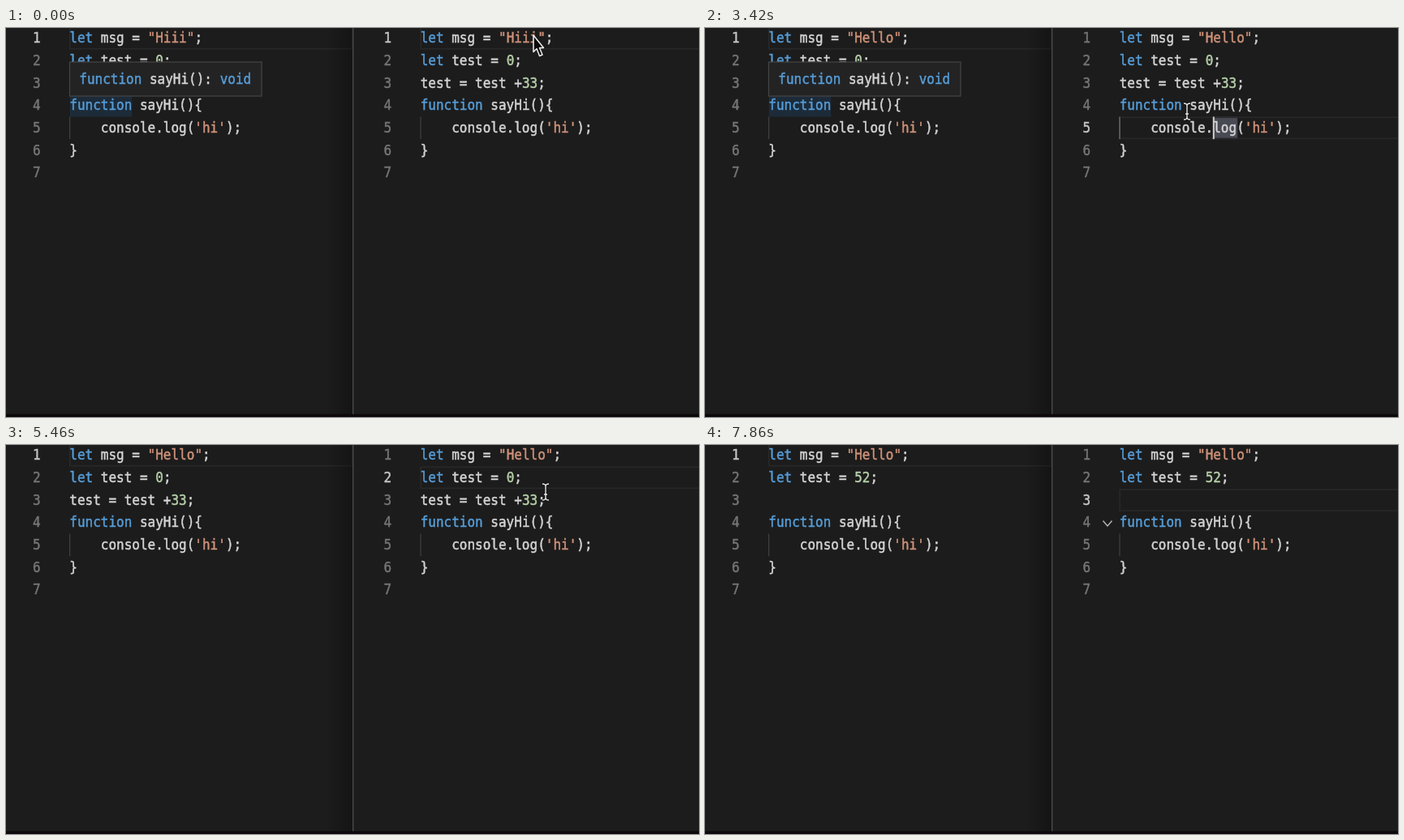
Write an HTML page that moves like this. It is 854 by 480 pixels and loops after 8000 ms.

```html
<!DOCTYPE html>
<html lang="en">
<head>
<meta charset="utf-8">
<title>Shared editor</title>
<style>
html, body { margin: 0; width: 100%; height: 100%; overflow: hidden; background: #1c1c1c; }
svg { display: block; width: 854px; height: 480px; }
text { font: 16px "DejaVu Sans Mono", monospace; white-space: pre; }
text, tspan { fill: currentColor; stroke: currentColor; stroke-width: .45px; }
</style>
</head>
<body>
<svg viewBox="0 0 854 480">
  <defs>
    <linearGradient id="shade">
      <stop offset="0" stop-color="#000" stop-opacity="0"/>
      <stop offset="1" stop-color="#000" stop-opacity=".28"/>
    </linearGradient>
    <path id="ibeam" d="M-4-10Q0-10 0-7Q0-10 4-10M0-7V7M-4 10Q0 10 0 7Q0 10 4 10M-2 3H2"/>
  </defs>
  <rect width="854" height="480" fill="#1c1c1c"/>
  <g id="scene"></g>
  <rect x="394" width="33" height="480" fill="url(#shade)"/>
  <rect x="427" width="1.4" height="480" fill="#4a4a4a"/>
  <rect y="476.5" width="854" height="3.5" fill="#0d080b"/>
  <g id="mouse">
    <path id="arrow" d="M0 0V20.5L4 16.5 7.5 25.5 11 24 7.5 15.5H12.5Z" fill="#0a0a0a" stroke="#eee" stroke-width="1.5" stroke-linejoin="round"/>
    <g id="beam" fill="none">
      <use href="#ibeam" stroke="#111" stroke-width="3"/>
      <use href="#ibeam" stroke="#e8e8e8" stroke-width="1.4"/>
    </g>
  </g>
</svg>
<script>
const LOOP = 8000, STEP = 60, BLINK = 480;
const CHAR = 9.633, ROW = 27.67, STRETCH = 1.15;
const LEFT = 78.3, RIGHT = 510.7;

// Key moments in ms
const FOCUS = 360, ERASE = 1680, TYPE = 2040, TYPED = 2520, CLICK_LOG = 3240,
  TIP_GONE = 3840, CLICK_NUMBER = 4980, EDIT = 5760, EDITED = 6000,
  DRAG = 6480, DROP = 6660, FOLD = 6840, DELETE = 7380;
// The caret stays lit during each span and blinks after it.
const BUSY = [[FOCUS, FOCUS], [ERASE, TYPED], [CLICK_LOG, CLICK_LOG],
  [CLICK_NUMBER, CLICK_NUMBER], [EDIT, EDITED], [DRAG, DROP], [DELETE, DELETE]];
// Pointer moves: start, end, x, y
const MOVES = [[60, 180, 655, 24], [540, 1260, 648, 33], [2820, 3180, 627, 123],
  [CLICK_LOG, 3420, 594, 103], [3420, 3600, 208, 108], [3600, 4080, 170, 116],
  [4200, CLICK_NUMBER, 627, 42], [5220, 5460, 665, 58], [6300, DRAG, 668, 67],
  [DRAG, 6840, 495, 66]];

const $ = id => document.getElementById(id);
const clamp = (v, lo, hi) => Math.min(hi, Math.max(lo, v));
const keys = (t, start, gap, max) => clamp(Math.floor((t - start) / gap) + 1, 0, max);

function mouseAt(t) {
  let x = 650, y = 9;
  for (const [start, end, nx, ny] of MOVES) {
    const u = clamp((t - start) / (end - start), 0, 1), e = u * u * (3 - 2 * u);
    x += (nx - x) * e;
    y += (ny - y) * e;
  }
  return [x, y];
}

function caretLit(t) {
  const span = BUSY.filter(s => s[0] <= t).pop();
  return span && Math.floor(Math.max(0, t - span[1]) / BLINK) % 2 === 0;
}

function activeRow(t) {
  if (t >= DRAG) return 2;
  if (t >= CLICK_NUMBER) return 1;
  return t >= CLICK_LOG ? 4 : 0;
}

const rect = (x, y, w, h, fill, more = '') =>
  `<rect x="${x}" y="${y}" width="${w}" height="${h}" fill="${fill}" ${more}/>`;
const rowTop = row => row * ROW - 1.2;
const bar = (x, row, w, fill) => rect(x, rowTop(row), w, ROW, fill);
const text = (x, y, s, color = '#d4d4d4') =>
  `<text transform="translate(${x} ${y}) scale(1 ${STRETCH})" color="${color}">${s}</text>`;

function paint(s) {
  return s.replace(/(let|function|void)|("[^"]*"|'[^']*')|\d+/g, (m, word, str) =>
    `<tspan color="${word ? '#569cd6' : str ? '#ce9178' : '#b5cea8'}">${m}</tspan>`);
}

function pane(x, edge, lines, active, boxed) {
  let out = '';
  if (boxed) out += rect(x + .5, rowTop(active) + .8, edge - x, ROW - 1.6, 'none',
    'stroke="#282828" stroke-width="1.6"');
  out += bar(x - .3, 4, 1.2, active === 4 ? '#777' : '#404040');
  lines.forEach((line, i) => {
    const y = 18.4 + i * ROW;
    out += text(x - 45.3, y, i + 1, i === active ? '#c6c6c6' : '#757575');
    out += text(x, y, paint(line));
  });
  return out;
}

const hover = () =>
  rect(78.5, 42, 236.5, 42, '#232324', 'stroke="#454545" stroke-width="1.2"') +
  text(90.3, 69, paint('function sayHi(): void'));

function draw(t) {
  const greeting = 'Hiii'.slice(0, 4 - keys(t, ERASE, 90, 3)) +
    'ello'.slice(0, keys(t, TYPE, 160, 4));
  const number = t < EDIT ? '0' : '52'.slice(0, keys(t, EDIT + 120, 120, 2));
  const cut = t > DELETE, selecting = t >= DRAG && !cut, tip = t < TIP_GONE;
  const lines = [`let msg = "${greeting}";`, `let test = ${number};`,
    cut ? '' : 'test = test +33;', 'function sayHi(){', "    console.log('hi');", '}', ''];

  const active = activeRow(t), [mx, my] = mouseAt(t);
  const full = 16 * CHAR, edge = clamp(mx - RIGHT, 0, full);
  const column = [11 + greeting.length, 11 + number.length, 0, 0, 12][active];
  const caret = RIGHT + (selecting ? edge : column * CHAR);

  let out = '';
  if (tip) out += bar(LEFT + .5, 3, 8 * CHAR - .5, '#1d2b39');
  if (active === 4) out += bar(RIGHT + 12 * CHAR + 1, 4, 3 * CHAR, '#474a53');
  if (selecting) out += bar(RIGHT + edge, 2, full - edge + 1, '#264f78');
  out += pane(LEFT, 426, lines, 0, true);
  out += pane(RIGHT, 858, lines, active, !selecting);
  if (tip) out += hover();
  if (caretLit(t)) out += bar(caret - .5, active, 2, '#d0d0d0');
  const fold = clamp((t - FOLD) / 180, 0, 1);
  out += `<path d="M490.5 93.5L496 100L501.5 93.5" fill="none" stroke="#b8b8b8" stroke-width="1.4" opacity="${fold}"/>`;
  $('scene').innerHTML = out;

  // Typing hides the pointer until it moves again.
  const hidden = (t >= ERASE && t < 2820) || (t >= EDIT && t < 6300) || cut;
  const arrow = t < 60 || mx < RIGHT;
  $('mouse').setAttribute('transform', `translate(${mx} ${my})`);
  $('mouse').setAttribute('visibility', hidden ? 'hidden' : 'visible');
  $('arrow').style.display = arrow ? '' : 'none';
  $('beam').style.display = arrow ? 'none' : '';
}

let shown = -1;
const start = performance.now();
function tick() {
  const t = Math.floor(((performance.now() - start) % LOOP) / STEP) * STEP;
  if (t !== shown) draw(shown = t);
  requestAnimationFrame(tick);
}
tick();
</script>
</body>
</html>
```
